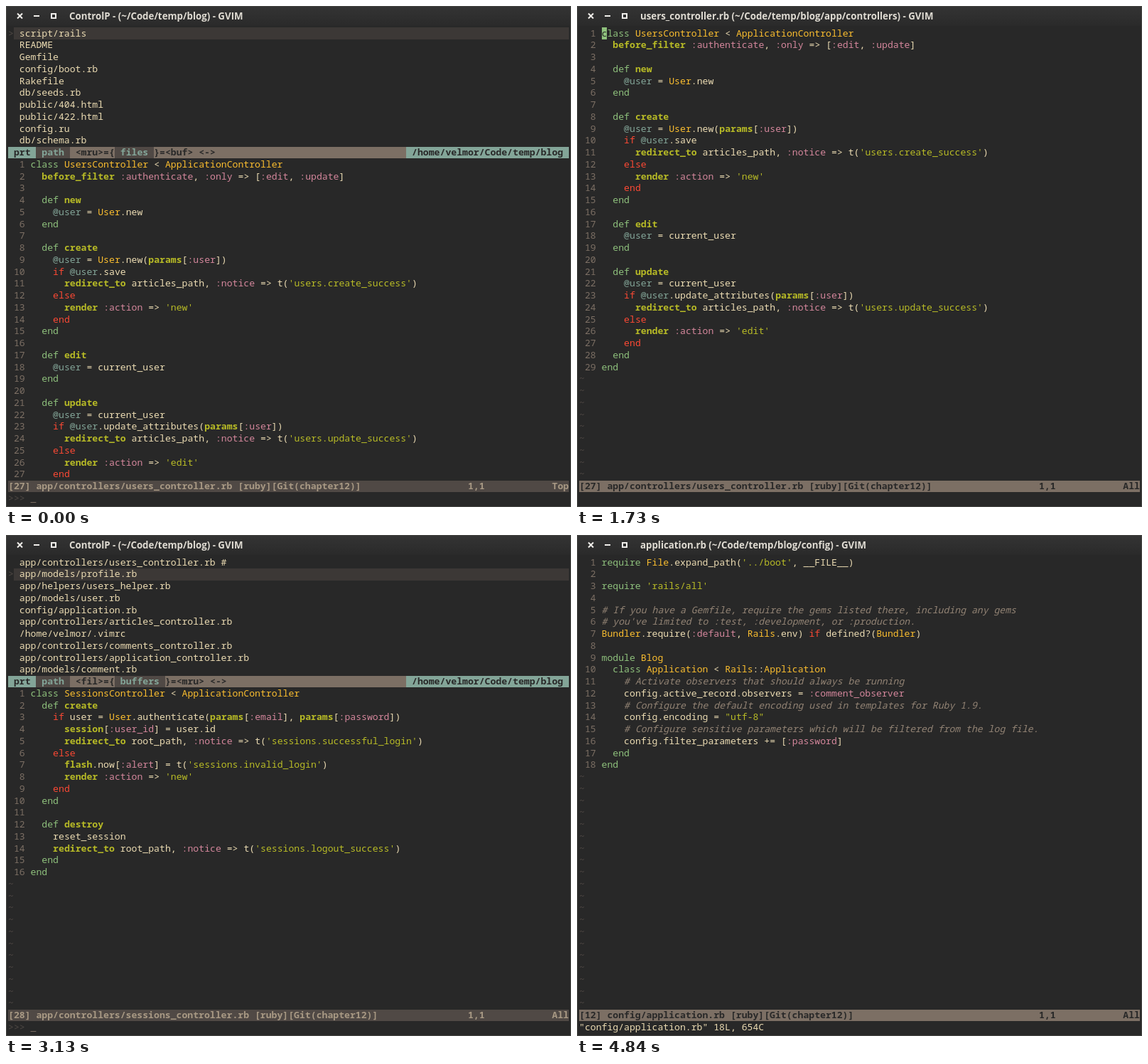
Animation, 795 px wide and 704 px high, one loop 4890 ms. Source, as an HTML page with a canvas:

```html
<!DOCTYPE html>
<html lang="en">
<head>
<meta charset="utf-8">
<title>Fuzzy file finder</title>
<style>
html, body { margin: 0; width: 100%; height: 100%; overflow: hidden; background: #282828; }
canvas { display: block; }
</style>
</head>
<body>
<canvas id="stage" width="795" height="704"></canvas>
<script>
const ctx = document.getElementById('stage').getContext('2d');
const LOOP = 4890, LEFT = 3, TOP = 30, CW = 7.89, RH = 16.75, RIGHT = 792, STATUS_ROW = 38;
const C = {
  bg: '#282828', line: '#3c3836', dim: '#504945', mid: '#7c6f64', gray: '#928374', soft: '#a89984', fg: '#ebdbb2',
  aqua: '#8ec07c', green: '#b8bb26', yellow: '#fabd2f', red: '#fb4934', purple: '#d3869b', blue: '#83a598'
};
const ROOT = '/home/velmor/Code/temp/blog';
const rows = text => text.trim().split('\n');

const users = {
  path: 'app/controllers/users_controller.rb', id: 27, git: 'chapter12',
  code: rows(`
class UsersController < ApplicationController
  before_filter :authenticate, :only => [:edit, :update]

  def new
    @user = User.new
  end

  def create
    @user = User.new(params[:user])
    if @user.save
      redirect_to articles_path, :notice => t('users.create_success')
    else
      render :action => 'new'
    end
  end

  def edit
    @user = current_user
  end

  def update
    @user = current_user
    if @user.update_attributes(params[:user])
      redirect_to articles_path, :notice => t('users.update_success')
    else
      render :action => 'edit'
    end
  end
end`)
};
const sessions = {
  path: 'app/controllers/sessions_controller.rb', id: 28, git: 'chapter12',
  code: rows(`
class SessionsController < ApplicationController
  def create
    if user = User.authenticate(params[:email], params[:password])
      session[:user_id] = user.id
      redirect_to root_path, :notice => t('sessions.successful_login')
    else
      flash.now[:alert] = t('sessions.invalid_login')
      render :action => 'new'
    end
  end

  def destroy
    reset_session
    redirect_to root_path, :notice => t('sessions.logout_success')
  end
end`)
};
const application = {
  path: 'config/application.rb', id: 12, git: 'chapter12',
  code: rows(`
require File.expand_path('../boot', __FILE__)

require 'rails/all'

# If you have a Gemfile, require the gems listed there, including any gems
# you've limited to :test, :development, or :production.
Bundler.require(:default, Rails.env) if defined?(Bundler)

module Blog
  class Application < Rails::Application
    # Activate observers that should always be running
    config.active_record.observers = :comment_observer
    # Configure the default encoding used in templates for Ruby 1.9.
    config.encoding = "utf-8"
    # Configure sensitive parameters which will be filtered from the log file.
    config.filter_parameters += [:password]
  end
end`)
};

const FILES = ['mru', 'files', 'buf'], BUFFERS = ['fil', 'buffers', 'mru'];
const allFiles = { modes: FILES, items: rows(`
script/rails
README
Gemfile
config/boot.rb
Rakefile
db/seeds.rb
public/404.html
public/422.html
config.ru
db/schema.rb`) };
const looseHits = { modes: FILES, items: rows(`
app/controllers/articles_controller.rb
app/controllers/comments_controller.rb
app/controllers/sessions_controller.rb
app/views/comments/destroy.js.erb
config/environments/production.rb
config/initializers/inflections.rb
config/initializers/secret_token.rb
config/initializers/session_store.rb
test/functional/users_controller_test.rb
app/controllers/application_controller.rb`) };
const closeHits = { modes: FILES, items: rows(`
app/controllers/articles_controller.rb
app/controllers/comments_controller.rb
app/controllers/sessions_controller.rb
test/functional/users_controller_test.rb
app/controllers/application_controller.rb
test/functional/articles_controller_test.rb
test/functional/comments_controller_test.rb
test/functional/sessions_controller_test.rb`) };
const buffers = { modes: BUFFERS, items: rows(`
app/controllers/users_controller.rb #
app/models/profile.rb
app/helpers/users_helper.rb
app/models/user.rb
config/application.rb
app/controllers/articles_controller.rb
/home/velmor/.vimrc
app/controllers/comments_controller.rb
app/controllers/application_controller.rb
app/models/comment.rb`) };

// [start ms, file, finder list, selected row (or cursor on/off), query or message]
const steps = [
  [0, users, allFiles, 0, ''],
  [40, users, looseHits, 0, 'c'],
  [140, users, looseHits, 0, 'co'],
  [230, users, looseHits, 0, 'cont'],
  [330, users, looseHits, 0, 'contr'],
  [430, users, looseHits, 0, 'contro'],
  [570, users, closeHits, 0, 'control'],
  [660, users, closeHits, 0, 'controll'],
  [1120, users, closeHits, 1, 'controll'],
  [1270, users, closeHits, 2, 'controll'],
  [1730, users, null, true, ''],
  [1780, sessions, null, true, ''],
  [1830, sessions, null, true, `"~/Code/temp/blog/${sessions.path}" 16L, 451C`],
  [2550, sessions, buffers, 0, ''],
  [3090, sessions, buffers, 1, ''],
  [3250, sessions, buffers, 2, ''],
  [3420, sessions, buffers, 3, ''],
  [3580, sessions, buffers, 4, ''],
  [4040, sessions, null, true, ''],
  [4130, application, null, true, `"${application.path}" 18L, 654C`],
  [4840, application, null, false, `"${application.path}" 18L, 654C`]
];

const colX = col => LEFT + col * CW;
const rowY = row => Math.round(TOP + row * RH);

function fill(row, col, end, color) {
  const x = Math.round(colX(col)), right = end >= 100 ? RIGHT : Math.round(colX(end));
  ctx.fillStyle = color;
  ctx.fillRect(x, rowY(row), right - x, rowY(row + 1) - rowY(row));
}

function put(row, col, text, color = C.fg, style = '') {
  ctx.font = `${style} ${CW / 0.6}px "Noto Sans Mono", "DejaVu Sans Mono", monospace`;
  ctx.fillStyle = color;
  ctx.fillText(text, colX(col), Math.round(TOP + row * RH + 12.7));
}

const TOKEN = /(#.*)|('[^']*'|"[^"]*")|(::)|(:\w+)|(@\w+)|\b(class|def|module|end|if|else)\b|\b([A-Z]\w*)|\b(before_filter|redirect_to|render|params|flash|session)\b|(^require)|(\w+|\s+|.)/g;

function putCode(row, line) {
  let afterDef = false;
  for (const m of line.matchAll(TOKEN)) {
    const [text, comment, string, , symbol, ivar, word, constant, helper, include] = m;
    let color = C.fg, style = '';
    if (comment) { color = C.gray; style = 'italic'; }
    else if (string) color = C.green;
    else if (symbol) color = C.purple;
    else if (ivar) color = C.blue;
    else if (word) {
      const branch = /if|else/.test(word) || (word === 'end' && m.index === 4);
      color = branch ? C.red : C.aqua;
    }
    else if (constant) color = C.yellow;
    else if (include) color = C.aqua;
    else if (helper || (afterDef && text.trim())) { color = C.green; style = 'bold'; }
    if (text.trim()) {
      put(row, 4 + m.index, text, color, style);
      afterDef = word === 'def';
    }
  }
}

function drawFrame(title) {
  ctx.fillStyle = C.bg;
  ctx.fillRect(0, 0, 795, 704);
  const bar = ctx.createLinearGradient(0, 0, 0, 28);
  bar.addColorStop(0, '#343434');
  bar.addColorStop(1, '#2a2a2a');
  ctx.fillStyle = bar;
  ctx.fillRect(0, 0, 795, 28);
  ctx.strokeStyle = '#454542';
  ctx.lineWidth = 1;
  ctx.strokeRect(0.5, 0.5, 794, 703);

  ctx.strokeStyle = '#f0eeea';
  ctx.lineWidth = 2;
  ctx.beginPath();
  ctx.moveTo(16, 10.5); ctx.lineTo(23, 17.5);
  ctx.moveTo(23, 10.5); ctx.lineTo(16, 17.5);
  ctx.moveTo(39, 14); ctx.lineTo(47, 14);
  ctx.stroke();
  ctx.strokeRect(64, 11, 6, 6);

  ctx.font = 'bold 13.3px "Open Sans", "Noto Sans", sans-serif';
  ctx.fillStyle = '#dfdbd2';
  ctx.fillText(title, 89, 19);
}

// Matches the query letters in order, as the finder does
const fuzzy = query => new RegExp([...query].map((ch, i) => i ? `[^${query[i - 1]}]*?${ch}` : ch).join(''), 'g');

function drawFinder(list, selected, query) {
  fill(selected, 1, 100, C.line);
  if (!query) put(selected, 0, '>', C.dim);
  list.items.forEach((item, row) => {
    let pos = 0;
    const part = (end, color) => {
      put(row, 2 + pos, item.slice(pos, end), color);
      pos = end;
    };
    if (query) for (const m of item.matchAll(fuzzy(query))) {
      part(m.index, C.fg);
      part(m.index + m[0].length, C.yellow);
    }
    part(item.length, C.fg);
  });

  const row = list.items.length, [prev, mode, next] = list.modes;
  let col = 0;
  const segment = (text, back, color) => {
    fill(row, col, col + text.length, back);
    put(row, col, text, color, 'bold');
    col += text.length;
  };
  fill(row, 0, 100, C.mid);
  segment(' prt ', C.blue, C.bg);
  segment(' path ', C.dim, C.blue);
  segment(` <${prev}>={`, C.mid, C.bg);
  segment(` ${mode} `, C.dim, C.blue);
  segment(`}=<${next}> <->`, C.mid, C.bg);
  col = 98 - ROOT.length;
  segment(` ${ROOT} `, C.blue, C.bg);

  put(39, 0, '>>>', C.dim);
  put(39, 4, query);
  put(39, 4 + query.length, '_', C.mid);
}

function drawFile(file, top, active) {
  const { code, path, id, git } = file;
  for (let row = top; row < STATUS_ROW; row++) {
    const n = row - top;
    if (n < code.length) {
      put(row, 0, String(n + 1).padStart(3), C.mid);
      putCode(row, code[n]);
    } else put(row, 0, '~', C.dim);
  }
  const color = active ? C.bg : C.soft;
  fill(STATUS_ROW, 0, 100, active ? C.mid : C.dim);
  put(STATUS_ROW, 0, `[${id}] ${path} [ruby][Git(${git})]`, color, 'bold');
  put(STATUS_ROW, 82, '1,1', color, 'bold');
  put(STATUS_ROW, 97, code.length > STATUS_ROW - top ? 'Top' : 'All', color, 'bold');
}

function draw([, file, list, mark, text]) {
  const cut = file.path.lastIndexOf('/');
  drawFrame(list
    ? 'ControlP - (~/Code/temp/blog) - GVIM'
    : `${file.path.slice(cut + 1)} (~/Code/temp/blog/${file.path.slice(0, cut)}) - GVIM`);
  drawFile(file, list ? list.items.length + 1 : 0, !list);
  if (list) return drawFinder(list, mark, text);
  put(39, 0, text);
  if (mark) {
    fill(0, 4, 5, C.aqua);
    put(0, 4, file.code[0][0], C.bg);
  }
}

const start = performance.now();
function tick() {
  const t = (performance.now() - start) % LOOP;
  draw(steps.findLast(step => step[0] <= t));
  requestAnimationFrame(tick);
}
tick();
</script>
</body>
</html>
```
